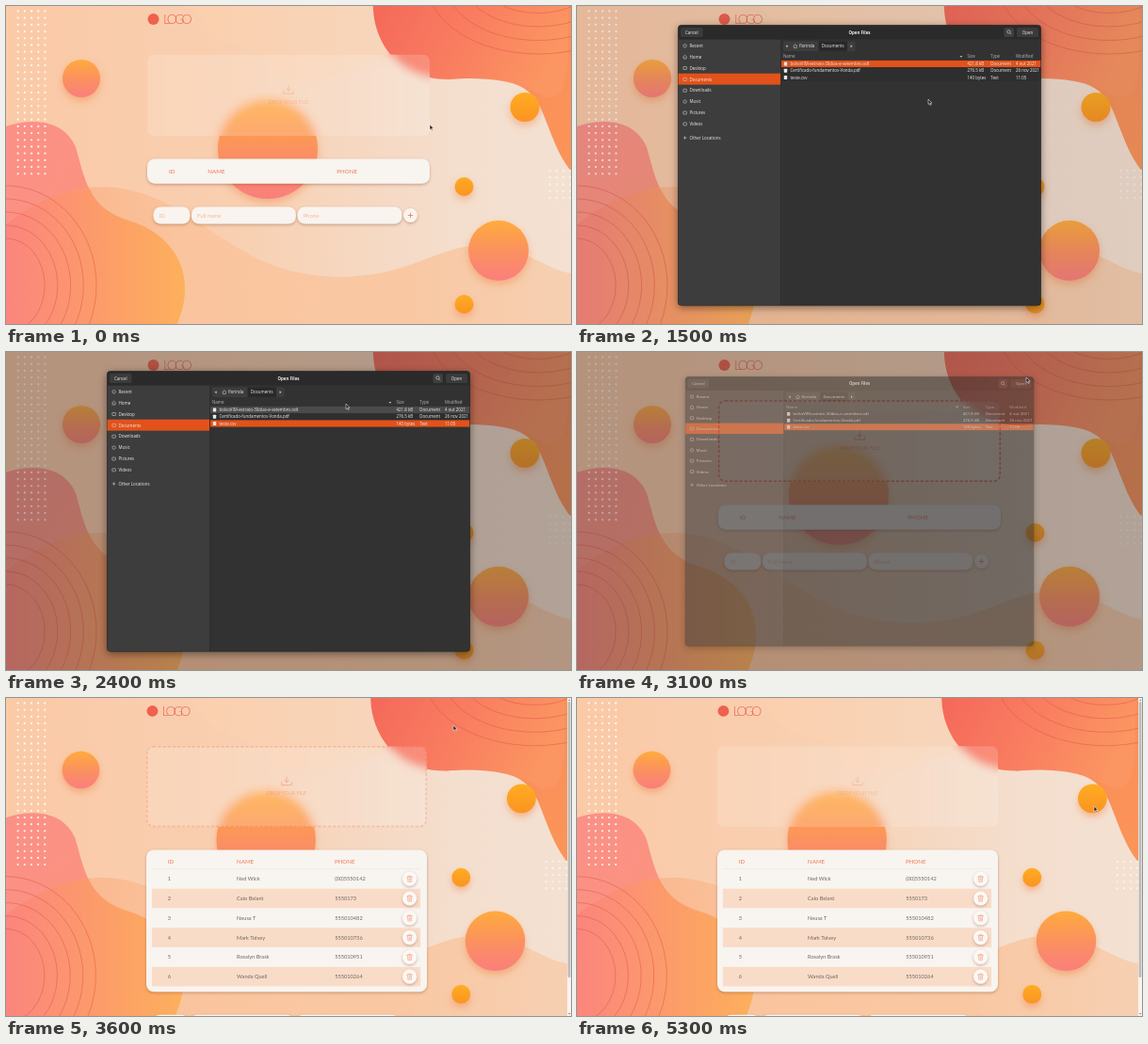
These frames come from a looping animation (600 by 338 pixels, 5400 ms). An HTML page:

```html
<!DOCTYPE html>
<html lang="en">
<head>
<meta charset="utf-8">
<title>Contact import</title>
<style>
  html, body { margin: 0; width: 100%; height: 100%; overflow: hidden; background: #f9ccaa; }
  svg { display: block; width: 100vw; height: 100vh; }
  .lato { font-family: Lato, sans-serif; }
  .sys { font-family: "Open Sans", "Noto Sans", sans-serif; font-size: 4.45px; fill: #eee; }
  .head { font-size: 6.2px; fill: #ee7653; }
  .cell { font-size: 5.7px; fill: #6d6661; }
  .hint { font-size: 6px; fill: #f5b79c; }
  .line { fill: none; stroke: #ee7653; stroke-width: .8; stroke-linecap: round; stroke-linejoin: round; }
  .thin { stroke: #f09a78; stroke-width: .6; }
</style>
</head>
<body>
<svg viewBox="0 0 600 338" preserveAspectRatio="none">
  <defs>
    <linearGradient id="base"><stop stop-color="#fbc9a6"/><stop offset=".4" stop-color="#f8cfb0"/><stop offset=".8" stop-color="#f4dfcf"/><stop offset="1" stop-color="#f4e1d2"/></linearGradient>
    <linearGradient id="cap"><stop stop-color="#fbcfad"/><stop offset="1" stop-color="#f7d6bc"/></linearGradient>
    <linearGradient id="wave"><stop stop-color="#fb9a66" stop-opacity=".45"/><stop offset=".3" stop-color="#fac198" stop-opacity=".75"/><stop offset=".7" stop-color="#f9c8a3"/><stop offset="1" stop-color="#f6d0b3"/></linearGradient>
    <linearGradient id="left" x2="1" y2=".8"><stop stop-color="#fb9088"/><stop offset=".4" stop-color="#fb9280"/><stop offset="1" stop-color="#fdb45c"/></linearGradient>
    <linearGradient id="front"><stop stop-color="#fb857d"/><stop offset=".5" stop-color="#fc9b6a"/><stop offset="1" stop-color="#fdb05c"/></linearGradient>
    <linearGradient id="coral" x2="1" y2=".25"><stop stop-color="#f4685a"/><stop offset=".5" stop-color="#f97c60"/><stop offset="1" stop-color="#fb9561"/></linearGradient>
    <linearGradient id="amber" x2=".6" y2="1"><stop stop-color="#f98a5c"/><stop offset="1" stop-color="#fb9459"/></linearGradient>
    <linearGradient id="ball" x2="0" y2="1"><stop stop-color="#ffab3e"/><stop offset=".55" stop-color="#fb8f62"/><stop offset="1" stop-color="#fa7f7c"/></linearGradient>
    <linearGradient id="gold" x2="0" y2="1"><stop stop-color="#ffac22"/><stop offset="1" stop-color="#fb9420"/></linearGradient>
    <filter id="blur" x="-5%" y="-5%" width="110%" height="110%"><feGaussianBlur stdDeviation="5"/></filter>
    <filter id="glow" x="-40%" y="-40%" width="180%" height="200%"><feDropShadow dx="0" dy="4" stdDeviation="4" flood-color="#ee8040" flood-opacity=".45"/></filter>
    <filter id="lift" x="-20%" y="-40%" width="140%" height="200%"><feDropShadow dx="0" dy="1.2" stdDeviation="1.4" flood-color="#8a5030" flood-opacity=".45"/></filter>
    <filter id="window" x="-10%" y="-10%" width="120%" height="120%"><feDropShadow dx="0" dy="2" stdDeviation="4" flood-opacity=".45"/></filter>
    <clipPath id="zoneClip"><rect x="150" y="51.5" width="300" height="86.5" rx="7"/></clipPath>
  </defs>

  <g id="page" class="lato">
    <g id="art"></g>
    <g clip-path="url(#zoneClip)">
      <use href="#art" filter="url(#blur)"/>
      <rect x="150" y="51.5" width="300" height="86.5" fill="#fff" opacity=".17"/>
    </g>
    <rect id="dash" x="150.7" y="52" width="298.6" height="85.3" rx="6.5" fill="none" stroke="#ee6a50" stroke-width="1.5" stroke-dasharray="3.4 1.8"/>
    <g id="drop">
      <path class="line" d="M300 84.5v5.6m-2.4-2.2 2.4 2.4 2.4-2.4M294.7 90.2v3h10.6v-3"/>
      <text x="300" y="103.8" text-anchor="middle" font-size="5.4" fill="#ee7653" opacity=".85">DROP YOUR FILE</text>
    </g>
    <circle cx="156.5" cy="14" r="6" fill="#f0604e"/>
    <text x="167" y="18.7" font-size="14" font-weight="300" letter-spacing="-2.8" fill="#f0604e">LOGO</text>
    <g id="card"></g>
    <g id="form"></g>
  </g>

  <g id="scroll">
    <rect x="596" width="4" height="338" fill="#faf3ee"/>
    <rect x="596.6" y="4" width="2.8" height="293" rx="1" fill="#bfbab6"/>
    <path d="M597 335h2.4l-1.2 1.6zM597 2.8h2.4l-1.2-1.6z" fill="#777"/>
  </g>
  <rect id="dim" width="600" height="338" fill="#3a3430"/>
  <g id="dialog" class="sys"></g>
  <g id="cursor">
    <path id="arrow" d="M0 0v5.6l1.3-1.1.9 2 1-.4-.9-2h1.7z" fill="#222" stroke="#fff" stroke-width=".5"/>
    <path id="hand" d="M-.6 3.5V.6q.6-.8 1.1 0v2.1l2.4.5q.8.2.7 1l-.5 2.4H.1L-2 4.4q0-1 1.4 0z" fill="#fff" stroke="#333" stroke-width=".6"/>
  </g>
</svg>
<script>
const $ = id => document.getElementById(id);
const range = (n, f) => Array.from({length: n}, (_, i) => f(i)).join('');
const text = (x, y, s, attrs = '') => `<text x="${x}" y="${y}" ${attrs}>${s}</text>`;
const box = (x, y, w, h, fill, rx = 0, attrs = '') =>
  `<rect x="${x}" y="${y}" width="${w}" height="${h}" rx="${rx}" fill="${fill}" ${attrs}/>`;
const disc = (x, y, r, fill, attrs = '') => `<circle cx="${x}" cy="${y}" r="${r}" fill="${fill}" ${attrs}/>`;
const shape = (d, fill, attrs = '') => `<path d="${d}" fill="${fill}" ${attrs}/>`;
const ring = (x, y, rx, ry) =>
  `<ellipse cx="${x}" cy="${y}" rx="${rx}" ry="${ry}" fill="none" stroke="#dd5148" stroke-width=".8" opacity=".6"/>`;
const dots = (x, y, cols, rows, opacity) => `<g opacity="${opacity}">` +
  range(cols * rows, i => disc(x + i % cols * 7.2, y + Math.floor(i / cols) * 7.2, 1.15, '#fff')) + '</g>';
const ball = (x, y, r, fill) => disc(x, y, r, `url(#${fill})`, 'filter="url(#glow)"');

const blob = 'M0 128C30 118 62 122 74 150C84 185 88 215 130 228C165 238 190 265 190 300C190 320 184 330 178 350H0Z';
const wave = 'M0 232C60 185 120 180 180 215C240 250 270 285 350 288C440 288 460 248 520 255C560 262 580 285 610 285V350H0Z';

$('art').innerHTML =
  `<clipPath id="waveClip">${shape(wave)}</clipPath>` +
  box(-20, -20, 640, 380, 'url(#base)') +
  shape('M185-5C212 5 205 32 245 41C285 50 278 82 325 82C360 82 370 58 405 60L420-5Z', 'url(#cap)') +
  shape(blob, 'url(#left)') + shape(wave, 'url(#wave)') +
  shape(blob, 'url(#front)', 'clip-path="url(#waveClip)"') +
  range(5, i => ring(0, 297, 96 - i * 13.7, 106 - i * 14)) +
  shape('M470 78C535 72 560 84 571 116C583 146 590 170 612 187V-5H470Z', 'url(#amber)') +
  shape('M390-5C388 30 410 78 470 78C525 74 550 84 573 97C595 101 597 70 597 45V-5Z', 'url(#coral)') +
  range(4, i => ring(565, -25, 118 - i * 20, 76 - i * 14.5)) +
  dots(12.7, 5.5, 5, 25, .85) + dots(577.5, 175, 4, 5, .6) +
  ball(80, 77, 20, 'ball') + ball(278, 152, 53, 'ball') + ball(523, 260, 32, 'ball') +
  ball(551, 107.5, 15.5, 'gold') + ball(486.5, 192, 10, 'gold') + ball(486.5, 317, 10, 'gold');

const people = [
  ['Ned Wick', '(00)5550142'], ['Caio Belaró', '5550173'], ['Neusa T', '555010482'],
  ['Mark Tolvey', '555010736'], ['Rosalyn Brask', '555010951'], ['Wanda Quell', '555010264']
];
const trash = y => disc(431.5, y, 7.6, '#fcf8f5', 'filter="url(#lift)"') +
  `<path class="line thin" d="M428.7 ${y - 2.2}h5.6m-3.6 0v-1h1.6v1M429.3 ${y - 2}l.4 5.2h3.6l.4-5.2m-2.7 1.4v2.4m1 -2.4v2.4"/>`;

function personRow([name, phone], i) {
  const y = 193.5 + i * 20.93;
  return (i % 2 ? box(156, y - 10.4, 287, 20.8, '#f9dcc8') : '') +
    text(173, y + 2, i + 1) + text(246.7, y + 2, name) + text(351.5, y + 2, phone) + trash(y);
}

function drawCard(filled) {
  const cols = [[173, 'ID'], [filled ? 246.7 : 214.3, 'NAME'], [351.3, 'PHONE']];
  $('card').innerHTML =
    box(150, 162.5, 300, filled ? 151.8 : 26.2, '#f8f4f0', 8, 'filter="url(#lift)"') +
    `<g class="head">${cols.map(([x, s]) => text(x, 177.7, s)).join('')}</g>` +
    (filled ? box(156, 182.8, 287, .4, '#eaded5') + `<g class="cell">${people.map(personRow).join('')}</g>` : '');
  $('form').setAttribute('transform', `translate(0 ${filled ? 125.6 : 0})`);
}

const fields = [[156.5, 39, 'ID'], [197, 111, 'Full name'], [309.5, 111, 'Phone']];
$('form').innerHTML =
  fields.map(([x, w, s]) => box(x, 213.5, w, 18, '#f9f4ef', 8, 'filter="url(#lift)"') +
    text(x + 6, 224.6, s, 'class="hint"')).join('') +
  disc(429.5, 222.5, 7.4, '#f9f4ef', 'filter="url(#lift)"') +
  '<path class="line" d="M427.2 222.5h4.6m-2.3-2.3v4.6"/>';

const places = ['Recent', 'Home', 'Desktop', 'Documents', 'Downloads', 'Music', 'Pictures', 'Videos'];
const files = [
  ['bolsoVIM-extrato-30dias-e-setembro.odt', '421.8 kB', 'Document', '4 out 2021'],
  ['Certificado-fundamentos-Vonda.pdf', '276.5 kB', 'Document', '26 nov 2021'],
  ['teste.csv', '140 bytes', 'Text', '11:05']
];
const house = (x, y) => `<path d="M${x - 2.2} ${y}l2.2-2 2.2 2m-3.6-.4v2.3h2.8v-2.3" fill="none" stroke="#ccc" stroke-width=".6"/>`;
const placeIcon = (i, y) => i === 1 ? house(114.6, y) :
  i === 0 || i === 5 ? `<circle cx="114.6" cy="${y}" r="1.7" fill="none" stroke="#ccc" stroke-width=".6"/>` :
  `<rect x="112.8" y="${y - 1.5}" width="3.6" height="3" rx=".4" fill="none" stroke="#ccc" stroke-width=".6"/>`;

function placeRow(name, i) {
  const y = 42.3 + i * 11.87;
  return (i === 3 ? box(107.5, y - 6.2, 108.7, 11.9, '#e2521a') : '') + placeIcon(i, y) + text(119.6, y + 1.6, name);
}

function fileRow(cells, i, selected, hovered) {
  const y = 61.5 + i * 7.25;
  const fill = i === selected ? '#e2521a' : i === hovered ? '#4b4b4b' : '#2e2e2e';
  return box(217, y - 3.6, 275.3, 7.2, fill) + box(219.8, y - 2, 3.4, 4, '#e8e8e8', .4) +
    cells.map((s, c) => text([226.5, 414.5, 439.3, 466][c], y + 1.6, s)).join('');
}

function drawDialog(selected, hovered) {
  $('dialog').innerHTML =
    box(107.5, 20.5, 385, 297.7, '#333', 3, 'stroke="#1c1c1c" stroke-width=".6" filter="url(#window)"') +
    box(107.8, 35.5, 108.4, 282.3, '#3d3d3d') + box(107.8, 20.8, 384.4, 14.7, '#2a2a2a', 2.5) +
    box(110, 23, 23.5, 10, '#3b3b3b', 1.6) + text(121.8, 29.6, 'Cancel', 'text-anchor="middle"') +
    text(300, 29.6, 'Open Files', 'text-anchor="middle" font-weight="700"') +
    box(453.5, 23, 10.5, 10, '#3f3f3f', 1.6) +
    '<path d="M459.8 28.7l1.5 1.5M460.2 27.4a1.7 1.7 0 1 1-3.4 0a1.7 1.7 0 1 1 3.4 0" fill="none" stroke="#ddd" stroke-width=".6"/>' +
    box(467, 23, 23, 10, '#3b3b3b', 1.6) + text(478.5, 29.6, 'Open', 'text-anchor="middle"') +
    places.map(placeRow).join('') + text(119.6, 141.7, 'Other Locations') +
    '<path d="M114.6 138.3v3.6m-1.8-1.8h3.6" stroke="#ccc" stroke-width=".6"/>' +
    box(216.2, 35.5, .5, 282.3, '#272727') +
    box(219, 37.5, 76.5, 10.4, '#3d3d3d', 1.6) + box(256.5, 37.5, 30.5, 10.4, '#292929') +
    shape('M223.6 41.2v3l-1.9-1.5zM290.6 41.2v3l1.9-1.5z', '#ccc') + house(231.8, 42.7) +
    text(236, 44.3, 'florinda') + text(259.8, 44.3, 'Documents') +
    [[219, 'Name'], [414.5, 'Size'], [439.3, 'Type'], [466, 'Modified']]
      .map(([x, s]) => text(x, 55.3, s, 'fill="#b5b5b5"')).join('') +
    shape('M406.4 53h3l-1.5 1.7z', '#bbb') +
    files.map((f, i) => fileRow(f, i, selected, hovered)).join('');
}

// Each row: time in ms, then values reached at that time.
const pointer = [
  [0, 450, 126], [600, 430, 112], [1300, 430, 112], [1500, 373, 99], [1800, 373, 99], [2000, 362, 75],
  [2200, 362, 75], [2400, 361, 55], [2800, 477, 27], [3100, 477, 27], [3400, 475, 29], [3700, 475, 29],
  [4100, 490, 54.5], [4800, 549, 113], [5200, 549, 113], [5300, 549, 115]
];
const shade = [[1300, 0], [1500, .11], [1800, .28], [2400, .36], [3100, .36], [3400, .156], [3600, 0]];
const hover = [[100, 0], [400, 1], [3200, 1], [3400, .85], [3700, 0]];
const dialogFade = [[1200, 0], [1400, 1], [3000, 1], [3200, 0]];

function at(keys, t) {
  const next = keys.findIndex(k => k[0] > t);
  if (next === 0) return keys[0].slice(1);
  if (next < 0) return keys[keys.length - 1].slice(1);
  const [a, b] = [keys[next - 1], keys[next]];
  const p = (t - a[0]) / (b[0] - a[0]);
  return a.slice(1).map((v, i) => v + (b[i + 1] - v) * p);
}

const LOOP = 5400, STEP = 100;
let cardState, dialogState;

function render(t) {
  const filled = t >= 3200;
  if (filled !== cardState) drawCard(cardState = filled);
  $('page').setAttribute('transform', `scale(${filled ? 596 / 600 : 1})`);
  $('scroll').style.display = filled ? '' : 'none';

  const [x, y] = at(pointer, t);
  const selected = t < 2000 ? 0 : 2;
  const hovered = y > 53 && y < 80 ? Math.floor((y + 3 - 57.8) / 7.25) : -1;
  const key = selected + ':' + hovered;
  if (key !== dialogState) { drawDialog(selected, hovered); dialogState = key; }

  const [over] = at(hover, t), [shown] = at(dialogFade, t);
  $('dash').setAttribute('opacity', over);
  $('drop').setAttribute('opacity', .35 + .65 * over);
  $('dim').setAttribute('opacity', at(shade, t)[0]);
  $('dialog').setAttribute('opacity', shown);
  const zoom = .92 + .08 * shown;
  $('dialog').setAttribute('transform', `translate(300 169) scale(${zoom}) translate(-300 -169)`);

  const pointing = t >= 200 && t < 1300;
  $('hand').style.display = pointing ? '' : 'none';
  $('arrow').style.display = pointing ? 'none' : '';
  $('cursor').setAttribute('transform', `translate(${x} ${y})`);
}

const start = performance.now();
function tick() {
  const t = (performance.now() - start) % LOOP;
  render(Math.floor(t / STEP) * STEP);
  requestAnimationFrame(tick);
}
tick();
</script>
</body>
</html>
```
